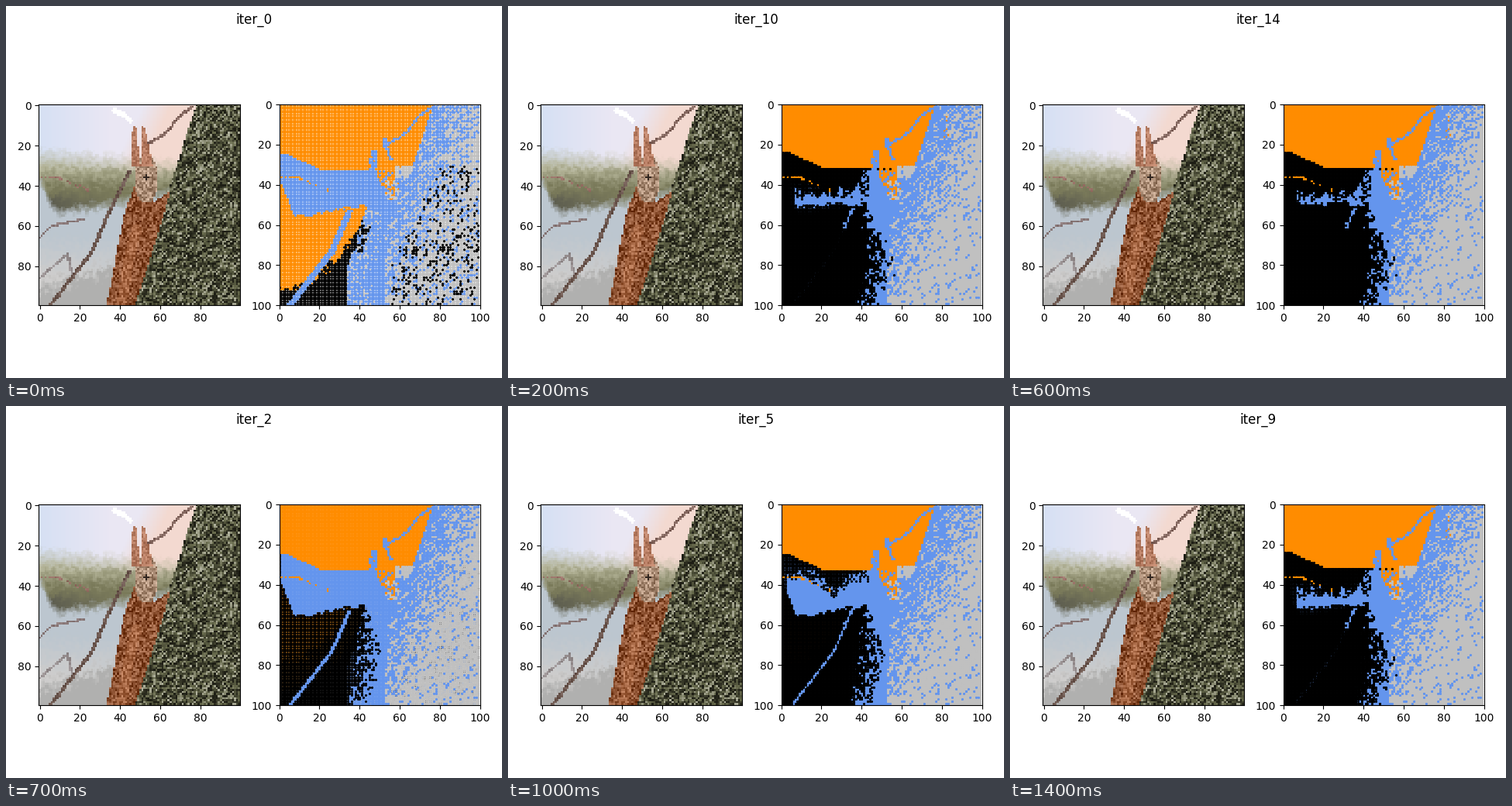
A matplotlib script for the animation above (1500 ms loop, 640 by 480 pixels).

```python
import numpy as np
import matplotlib.pyplot as plt
from matplotlib.animation import FuncAnimation
from matplotlib.path import Path

N, STEPS = 100, 15
ORANGE, SILVER, BLUE, BLACK = range(4)
COLORS = ["darkorange", "silver", "cornflowerblue", "black"]
ORDER = sorted(range(STEPS), key=str)  # iterations play in file-name order

rng = np.random.default_rng(4)
Y, X = np.mgrid[0:N, 0:N].astype(float)
CELLS = np.column_stack([X.ravel(), Y.ravel()])


def ramp(v, start, end):
    """Rise from 0 at start to 1 at end."""
    return np.clip((v - start) / (end - start), 0, 1)


def uniform(field):
    """Rank a field so that its values spread evenly over 0..1."""
    return field.ravel().argsort().argsort().reshape(field.shape) / field.size


def smear(*steps):
    """White noise averaged along (dy, dx) offsets."""
    noise = rng.random((N, N))
    return uniform(noise + sum(np.roll(noise, s, (0, 1)) for s in steps) + 0.4 * rng.random((N, N)))


def inside(*pts):
    return Path(pts).contains_points(CELLS).reshape(N, N)


def ellipse(x, y, rx, ry):
    return ((X - x) / rx) ** 2 + ((Y - y) / ry) ** 2 < 1


def near(*pts):
    """Distance of each cell to a polyline."""
    dist = np.full((N, N), 1e9)
    for (x0, y0), (x1, y1) in zip(pts, pts[1:]):
        dx, dy = x1 - x0, y1 - y0
        t = np.clip(((X - x0) * dx + (Y - y0) * dy) / (dx * dx + dy * dy), 0, 1)
        dist = np.minimum(dist, np.hypot(X - x0 - t * dx, Y - y0 - t * dy))
    return dist


grain = uniform(rng.random((N, N)))
soft = smear((0, 1), (1, 0), (1, 1))
bark = smear((-1, 1))
knots = smear((-1, 0), (-2, 1))
patch = uniform(grain + soft)
wobble = soft - 0.5

branch = near((5, 100), (26, 73), (36, 50), (45, 33))
twig = near((53, 20), (63, 14), (69, 6), (76, 1))
berries = near((0, 36), (9, 36), (25, 43))
shore = 57 - 17 * np.exp(-((X / 5) ** 2)) - 0.17 * X


# ---- picture on the left ----

def blend(img, rgb, alpha):
    alpha = np.broadcast_to(alpha, (N, N))[..., None]
    return img * (1 - alpha) + np.array(rgb) * alpha


def paint(img, mask, rgb, spread=0, noise=grain):
    img[mask] = np.array(rgb) + (noise[mask, None] - 0.5) * spread


def picture():
    img = blend(np.full((N, N, 3), (214.0, 224, 243)), (234, 231, 243), ramp(X, 0, 35))
    img = blend(img, (243, 217, 208), ramp(X + 0.5 * Y, 52, 66))
    paint(img, near((37, 3), (42, 5), (45, 8)) < 1.3, (255, 255, 255))
    img = blend(img, (180, 180, 152), ramp(Y - 0.08 * X + 3 * wobble, 21, 31))
    img = blend(img, (122, 122, 90), ramp(Y + 5 * wobble, 31, 42))
    img = blend(img, (92, 92, 80), ramp(Y + 3 * wobble, 43, 48) * ramp(X, 40, 4))
    img = blend(img, (188, 198, 207), ramp(Y - shore + 3 * wobble, -5, 1))
    img = blend(img, (206, 205, 204), ramp(Y + 5 * wobble, 65, 85))
    img = blend(img, (176, 176, 175), ramp(Y + 0.3 * X + 8 * wobble, 88, 95))
    paint(img, (berries < 0.8) & (grain < 0.6), (165, 125, 115), 70)
    paint(img, near((0, 66), (6, 60), (22, 57)) < 0.6, (137, 120, 120), 30)
    paint(img, near((0, 86), (14, 74), (16, 84)) < 0.6, (150, 142, 143), 30)
    paint(img, branch < 0.9, (107, 86, 78), 40)
    paint(img, twig < 0.7, (135, 106, 98), 50)

    trunk = inside((78, -1), (63, 46), (56, 70), (47, 101), (101, 101), (101, -1))
    tone = uniform(bark + grain)
    wood = np.full((N, N, 3), (30.0, 30, 21))
    wood = blend(wood, (104, 107, 77), ramp(tone, 0.1, 0.7))
    wood = blend(wood, (190, 190, 172), ramp(tone, 0.7, 1.05))
    img[trunk] = wood[trunk]

    paint(img, inside((48, 38), (42, 54), (33, 101), (47, 101), (55, 76),
                      (60, 60), (65, 43), (57, 48)), (140, 81, 49), 95)
    paint(img, near((48, 62), (44, 78), (41, 99)) < 2.5, (166, 103, 68), 80)
    paint(img, ellipse(53, 37, 6, 12), (170, 140, 117), 95)
    for tip, left, right in [(47, 45.5, 50), (51.5, 50.5, 56)]:
        paint(img, inside((left, 30), (left, 18), (tip - 0.6, 10), (tip + 1, 12), (right, 30)),
              (184, 126, 100), 55)
    paint(img, ellipse(53, 36, 1.2, 1.2), (50, 38, 32))
    return np.clip(img, 0, 255).astype(np.uint8)


# ---- cluster map on the right ----

horizon = 24 + 8 * ramp(X, 4, 22)
lake = 92 - 0.019 * X ** 2
edge = np.maximum(76.5 - 0.33 * Y, 56)
trunk = X >= edge
silver_share = np.clip((X - 74 + 0.45 * Y) / 38, 0.04, 0.92)
left_ear = near((47, 24), (46, 36))
right_ear = near((52, 16), (53, 22), (56, 27))


def clusters(k):
    late = ramp(k, 3, 9)
    lab = np.full((N, N), BLACK)
    if k < 2:
        lab[Y < lake - 14 * k + 6 * wobble] = ORANGE

    # The blue band melts away from above and shrinks to a thin streak.
    bump = np.exp(-(((X - 26) / 6) ** 2))
    top = 46 * (1 - np.exp(-k / 3)) + (1 - late) * (12 * ramp(k, 1, 3) * bump - 3)
    low = 47 + (shore - 47) * (1 - 0.65 * ramp(k, 5, 11))
    band = (Y < low + 2 * wobble) & (patch < 0.5 + (Y - top) / 7) & (X > 6 * late)
    lab[band] = BLUE

    # The branch starts as a full line and breaks into a few specks.
    keep = np.maximum(1 - ramp(k, 5, 9), 0.02)
    lab[(branch < max(1.5 * np.exp(-k / 4), 0.55)) & (Y > 52) & (grain < keep)] = BLUE
    if k > 2:
        lab[(branch < 3.6) & (Y > 31) & (Y < 51) & (patch < 0.62)] = BLUE
        lab[(branch < 1) & (Y > 50) & (Y < 62) & (grain < 0.7)] = BLUE

    # Body
    if k < 2:
        left = 44 - 10 * ramp(Y, 50, 80)
        body = (X >= left) & (Y > 32)
        lab[body] = BLUE
        lab[body & (Y > 52) & (grain < 0.45 - 0.03 * (X - left))] = SILVER
        lab[body & (Y > 58) & (Y < 74) & (X < left + 5) & (soft > 0.6)] = BLACK
    else:
        middle = 43 + 6 * late * ramp(Y, 60, 72) - 6 * ramp(Y, 85, 100)
        fade = 2 + 14 * ramp(Y, 50, 75)
        limit = 40 - 6 * ramp(Y, 60, 78)
        lab[(Y > 32) & (X >= limit) & (patch < 0.5 + (X - middle) / fade)] = BLUE

    # Trunk
    lab[trunk & ((lab != BLACK) | (X > 57))] = BLUE
    share = silver_share * (0.8 + 0.2 * ramp(k, 0, 2)) + 0.12 * (k == 0)
    lab[(X >= edge - 3 * (Y > 35)) & (bark < share) & (lab == BLUE)] = SILVER
    if k < 2:
        dark = trunk & (Y > 30) & (X + 0.5 * Y > 95)
        lab[dark & (knots > 0.85 + 0.1 * k)] = BLACK

    # Sky, twig and head
    lab[(Y < horizon + (k < 6)) & ~trunk] = ORANGE
    lab[(twig < 0.55) & (grain < 0.85) & ~trunk] = BLUE
    lab[inside((57, 30.5), (68, 30.5), (64, 36), (58, 36)) & (grain < 0.9)] = SILVER
    lab[ellipse(53, 33, 4.5, 8) & (grain < 0.85)] = ORANGE
    chin = ellipse(56, 42, 4, 6)
    lab[chin & (grain < 0.35)] = ORANGE
    lab[chin & (grain > 0.72)] = SILVER
    lab[(left_ear < 1.8) & (grain < 0.8)] = BLUE
    lab[(right_ear < 0.9) & (grain < 0.8)] = BLUE
    lab[(berries < 0.6) & (grain < (0.8 - 0.02 * X))] = ORANGE
    if k > 5:
        lab[ellipse(82, 11, 2, 7) & (grain < 0.2)] = ORANGE
    return lab


# ---- figure ----

plt.rcParams["font.family"] = "DejaVu Sans"
fig, (photo_ax, map_ax) = plt.subplots(1, 2, figsize=(6.4, 4.8), dpi=100, facecolor="white")
title = fig.suptitle("iter_0", fontsize=12, y=0.982)

photo_ax.imshow(picture(), interpolation="nearest")
photo_ax.set(xticks=range(0, 100, 20), yticks=range(0, 100, 20))

layers = []
for k in range(STEPS):
    lab = clusters(k)
    layers.append([map_ax.scatter(X[lab == c], Y[lab == c], s=1.5, color=COLORS[c])
                   for c in range(4)])
map_ax.set(xlim=(0, 100), ylim=(100, 0), aspect="equal",
           xticks=range(0, 101, 20), yticks=range(0, 101, 20))
fig.tight_layout()


def update(i):
    k = ORDER[i]
    title.set_text(f"iter_{k}")
    # Earlier layers stay beneath and close the gaps between the dots.
    for j, layer in enumerate(layers):
        for dots in layer:
            dots.set_visible(k - 5 < j <= k)
    return []


anim = FuncAnimation(fig, update, frames=STEPS, interval=100, repeat=True, repeat_delay=0)
plt.show()
```
